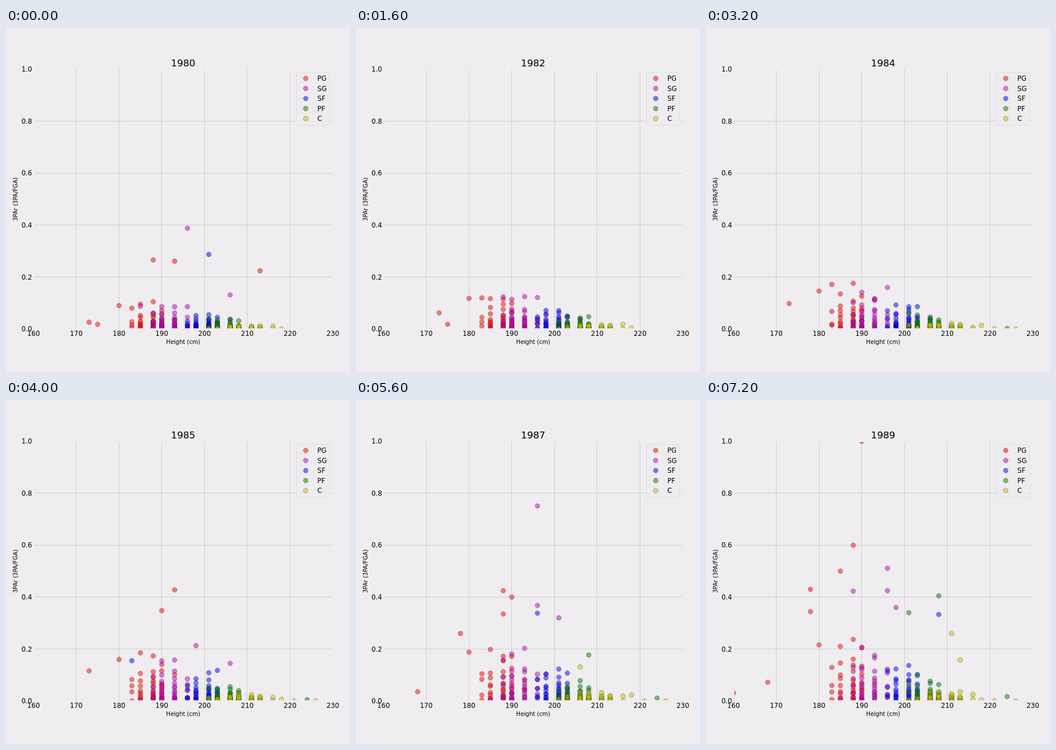
Animation of 600 by 600 pixels, one loop 8000 ms. Source, as an HTML page:

```html
<!DOCTYPE html>
<html lang="en">
<head>
<meta charset="utf-8">
<title>Three-point rate by height</title>
<style>
  html, body { margin: 0; width: 100%; height: 100%; overflow: hidden; background: #efedef; }
  svg { display: block; width: 100vw; height: 100vh; }
  text { font-family: "DejaVu Sans", Verdana, sans-serif; font-size: 11.67px; fill: #000; }
  .label { font-size: 10px; }
  .title { font-size: 16.67px; }
  .mid { text-anchor: middle; }
  .end { text-anchor: end; }
  .grid { stroke: #cbcbcb; stroke-width: .9; }
  .spine { fill: none; stroke: #efedef; stroke-width: 2.5; }
</style>
</head>
<body>
<svg id="stage" viewBox="0 0 600 600">
  <defs><clipPath id="plot"><rect x="48" y="72" width="522" height="453"/></clipPath></defs>
</svg>
<script>
const NS = 'http://www.w3.org/2000/svg';
const STEP = 800, FIRST = 1980, COUNT = 10;
const stage = document.getElementById('stage');
const px = h => 48 + 522 * (h - 160) / 70;
const py = v => 525 - 453 * v;
const snap = p => Math.floor(p) + .5;
const cm = inches => Math.round(inches * 2.54 - .01);

// Each role clusters around a mean height; rate is its typical share in the first season.
const ROLES = {
  PG: { color: '#ff0000', mean: 187.5, sd: 4, peak: 13, rate: .035 },
  SG: { color: '#bf00bf', mean: 192, sd: 4, peak: 14, rate: .032 },
  SF: { color: '#0000ff', mean: 200, sd: 3.5, peak: 15, rate: .022 },
  PF: { color: '#007f00', mean: 205, sd: 3.2, peak: 14, rate: .013 },
  C: { color: '#bfbf00', mean: 209.5, sd: 5, peak: 13, rate: .005 }
};

// Players outside the clusters: seasons they stay, first rate, yearly gain.
const REGULARS = [
  { role: 'PG', h: 173, from: 1980, to: 1986, rate: .026, gain: .018 },
  { role: 'PG', h: 175, from: 1980, to: 1983, rate: .018, gain: 0 },
  { role: 'PG', h: 180, from: 1980, to: 1989, rate: .09, gain: .014 },
  { role: 'PG', h: 168, from: 1986, to: 1989, rate: .018, gain: .018 },
  { role: 'PG', h: 160, from: 1988, to: 1989, rate: .038, gain: -.007 },
  { role: 'PF', h: 224, from: 1984, to: 1989, rate: .002, gain: .003 },
  { role: 'C', h: 221, from: 1984, to: 1989, rate: 0, gain: 0 },
  { role: 'C', h: 226, from: 1983, to: 1989, rate: 0, gain: 0 }
];

// Season leaders by role and height.
const LEADERS = {
  1980: { PG: { 188: .266, 193: .261, 213: .224 }, SG: { 196: .388, 206: .131 }, SF: { 201: .287 } },
  1981: { PG: { 185: .311, 188: .208 }, SG: { 193: .202, 196: [.587, .46, .354, .281] }, SF: { 198: .167 } },
  1983: { PG: { 190: .381, 193: .191 }, SG: { 188: .333, 196: .204 }, PF: { 208: .125 } },
  1985: { PG: { 190: .348, 193: .428 }, SG: { 198: .213, 206: .145 }, SF: { 183: .155 } },
  1987: { PG: { 178: .26, 188: [.425, .335], 190: .4 }, SG: { 196: [.751, .368], 201: .32 },
          SF: { 196: .338 }, PF: { 208: .177 }, C: { 206: .131 } },
  1988: { PG: { 178: [.462, .408], 188: .361, 190: [.633, .4], 196: 1 },
          SG: { 188: .333, 196: [.46, .367], 198: 1, 201: .383 }, PF: { 208: [.577, .335] } },
  1989: { PG: { 178: [.43, .344], 185: .5, 188: .6, 190: 1 }, SG: { 188: .423, 196: [.511, .425], 198: .36 },
          SF: { 208: .333 }, PF: { 201: .34, 208: .405 }, C: { 211: .26, 213: .158 } }
};

function add(parent, tag, attrs, text) {
  const el = document.createElementNS(NS, tag);
  for (const k in attrs) el.setAttribute(k, attrs[k]);
  if (text !== undefined) el.textContent = text;
  parent.appendChild(el);
  return el;
}

const dot = (parent, x, y, color) => add(parent, 'circle', {
  cx: x, cy: y, r: 4.17, fill: color, stroke: '#000',
  'fill-opacity': .5, 'stroke-opacity': .5, 'stroke-width': .5
});

function randomizer(seed) {
  return () => (seed = seed * 16807 % 2147483647) / 2147483647;
}

// Exponential spread of rates in each height column, sized by a bell curve.
function crowd(role, scale, rnd, put) {
  for (let inches = 71; inches <= 86; inches++) {
    const h = cm(inches);
    const n = Math.round(role.peak * Math.exp(-(((h - role.mean) / role.sd) ** 2)));
    for (let k = 0; k < n; k++) put(h, -scale * Math.log(1 - .95 * (k + rnd()) / n));
  }
}

function season(parent, year) {
  const g = add(parent, 'g', { display: 'none' });
  const rnd = randomizer(year * 7919);
  const growth = 1 + .17 * (year - FIRST);
  for (const name in ROLES) {
    const role = ROLES[name];
    const put = (h, v) => dot(g, px(h), py(v), role.color);
    crowd(role, role.rate * growth, rnd, put);
    for (const p of REGULARS)
      if (p.role === name && year >= p.from && year <= p.to) put(p.h, p.rate + p.gain * (year - p.from));
    const best = LEADERS[year]?.[name] ?? {};
    for (const h in best) [best[h]].flat().forEach(v => put(+h, v));
  }
  return g;
}

// Axes
for (let h = 160; h <= 230; h += 10) {
  const x = snap(px(h));
  if (h > 160 && h < 230) add(stage, 'line', { class: 'grid', x1: x, x2: x, y1: 72, y2: 525 });
  add(stage, 'text', { class: 'mid', x: px(h), y: 537 }, h);
}
for (let i = 0; i <= 5; i++) {
  const y = py(i / 5);
  if (i % 5) add(stage, 'line', { class: 'grid', x1: 48, x2: 570, y1: snap(y), y2: snap(y) });
  add(stage, 'text', { class: 'end', x: 45.5, y: y + 4.2 }, (i / 5).toFixed(1));
}
add(stage, 'text', { class: 'label mid', x: 309, y: 551 }, 'Height (cm)');
add(stage, 'text', { class: 'label mid', transform: 'translate(20 298.5) rotate(-90)' }, '3PAr (3PA/FGA)');
const title = add(stage, 'text', { class: 'title mid', x: 309, y: 67 }, '');

// Points, with the frame line covering their cut edges
const plot = add(stage, 'g', { 'clip-path': 'url(#plot)' });
const seasons = Array.from({ length: COUNT }, (_, i) => season(plot, FIRST + i));
add(plot, 'rect', { class: 'spine', x: 48, y: 72, width: 522, height: 453 });

// Legend
add(stage, 'rect', { x: 506.5, y: 77.5, width: 58, height: 92, rx: 2.5,
  fill: '#efedef', 'fill-opacity': .9, stroke: '#dddcdd', 'stroke-width': .8 });
Object.keys(ROLES).forEach((name, i) => {
  const y = 88 + 17.5 * i;
  dot(stage, 522.8, y, ROLES[name].color);
  add(stage, 'text', { x: 543, y: y + 4.1 }, name);
});

let shown = -1;
function draw(now) {
  const i = Math.floor(now / STEP) % COUNT;
  if (i === shown) return;
  seasons.forEach((g, k) => g.setAttribute('display', k === i ? 'inline' : 'none'));
  title.textContent = FIRST + i;
  shown = i;
}
function tick() {
  draw(performance.now());
  requestAnimationFrame(tick);
}
tick();
</script>
</body>
</html>
```
